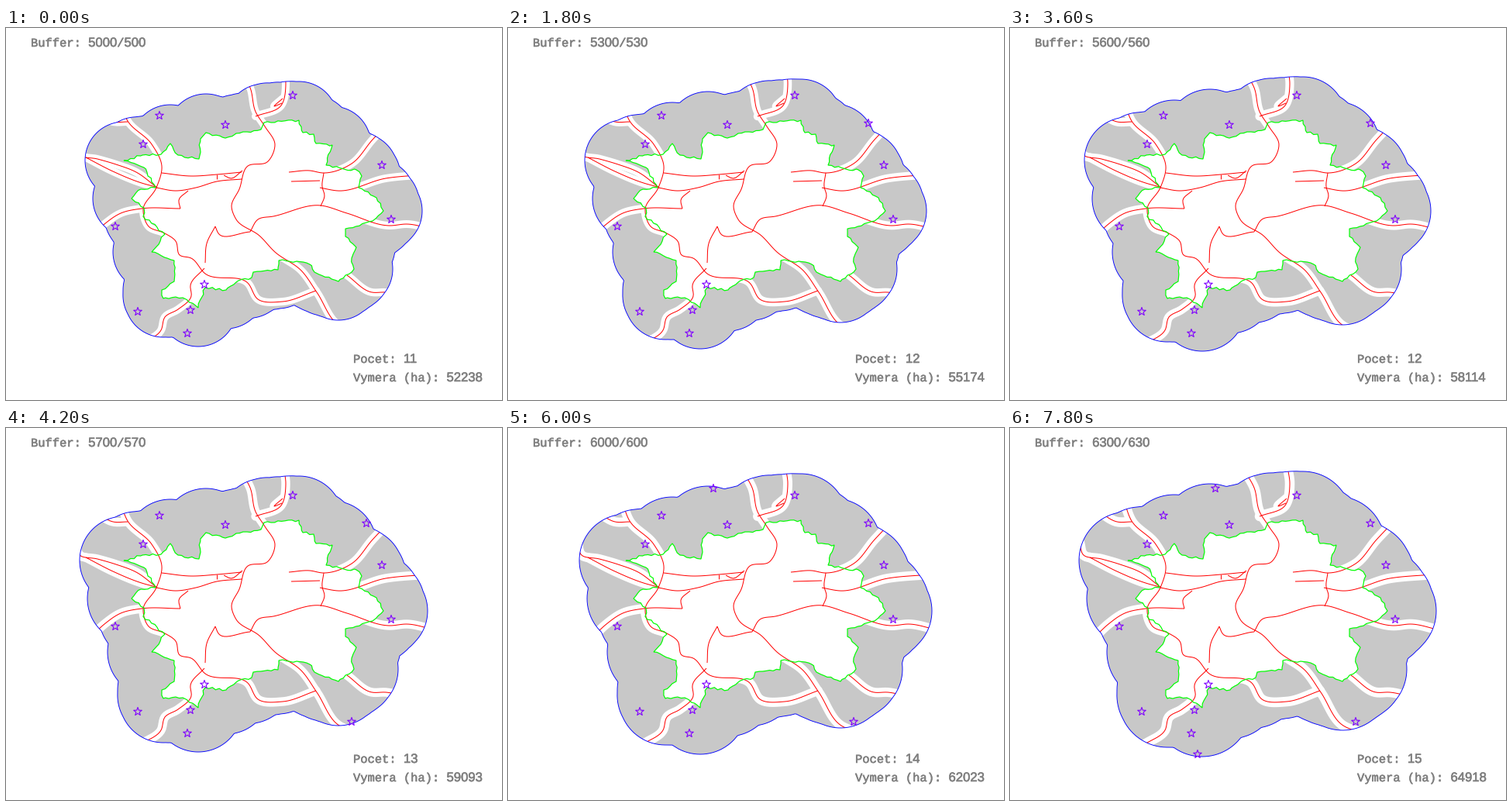
Write a matplotlib script that moves like this. It is 640x480 px and loops after 8000 ms.

```python
import numpy as np
import matplotlib.pyplot as plt
from matplotlib.animation import FuncAnimation
from matplotlib.collections import LineCollection, PolyCollection
from matplotlib.patches import PathPatch, Polygon
from matplotlib.path import Path
from matplotlib.patheffects import withStroke

W, H, DPI = 640, 480, 100
PX = 72 / DPI            # one pixel in points
SCALE = 0.01             # pixels per metre
RADII = np.arange(5000, 6301, 100)
FRAMES, INTERVAL, HOLD = 40, 200, 3
GREY, VIOLET, TEXT = "#c8c8c8", "#8000ff", "#808080"


def points(*xy):
    return np.array(xy, float).reshape(-1, 2)


def smooth(*xy):
    """Cubic curve through the key points, paced by chord length."""
    p = points(*xy)
    t = np.r_[0, np.cumsum(np.hypot(*np.diff(p, axis=0).T))]
    slope = np.gradient(p, t, axis=0)
    s = np.linspace(0, t[-1], max(2, int(t[-1] / 3)))
    k = np.clip(np.searchsorted(t, s, side="right") - 1, 0, len(p) - 2)
    h = (t[k + 1] - t[k])[:, None]
    u = (s - t[k])[:, None] / h
    return ((1 + 2 * u) * (1 - u) ** 2 * p[k] + u * (1 - u) ** 2 * h * slope[k]
            + u ** 2 * (3 - 2 * u) * p[k + 1] + u ** 2 * (u - 1) * h * slope[k + 1])


def ragged(corners, step=4.5, size=1.5):
    """Closed outline through the corners with a seeded uneven edge."""
    rng = np.random.default_rng(4)
    out = []
    for p, q in zip(corners, np.roll(corners, -1, axis=0)):
        length = np.hypot(*(q - p))
        normal = np.array([p[1] - q[1], q[0] - p[0]]) / length
        out.append(p)
        for u in np.arange(step, length - step / 2, step) / length:
            out.append(p + u * (q - p) + normal * rng.uniform(-size, size))
    return np.array(out)


# Corners of the city limits, clockwise from the western tip
CITY = ragged(points(
    152, 171, 176, 164, 200, 163, 212, 149, 222, 164, 249, 169, 251, 143,
    258, 135, 283, 142, 297, 136, 311, 134, 329, 131, 333, 122, 378, 119,
    383, 135, 397, 137, 400, 149, 421, 151, 413, 177, 436, 182, 452, 183,
    459, 191, 455, 206, 478, 219, 487, 236, 473, 249, 438, 259, 438, 269,
    452, 283, 446, 297, 449, 311, 429, 327, 398, 315, 392, 305, 375, 301,
    352, 300, 351, 312, 319, 315, 317, 322, 297, 328, 284, 338, 257, 335,
    248, 361, 228, 348, 203, 349, 201, 338, 217, 327, 217, 300, 188, 289,
    205, 266, 177, 243, 178, 232, 162, 220, 174, 208, 193, 206, 178, 180))

WEST_ROADS = [
    smooth(146, 90, 157, 120, 188, 150, 201, 178, 194, 206, 177, 234, 184, 256,
           205, 265, 219, 275, 224, 293, 239, 297, 257, 317, 312, 329, 325, 350,
           357, 353, 400, 339),
    smooth(116, 109, 138, 121, 157, 121),
    smooth(90, 148, 94, 163, 118, 169, 142, 176, 168, 186, 195, 206),
    smooth(103, 167, 138, 185, 175, 200, 193, 205),
    smooth(110, 269, 127, 253, 148, 239, 175, 233, 225, 233),
    smooth(225, 233, 223, 222, 235, 210),
    smooth(256, 310, 238, 332, 239, 346, 222, 363, 205, 373, 200, 390, 174, 408),
]
CENTRE_ROADS = [
    smooth(194, 206, 218, 210, 245, 206, 272, 198, 304, 195),
    smooth(201, 187, 238, 191, 272, 189, 304, 186),
    smooth(272, 189, 272, 195),
    smooth(281, 190, 290, 194, 305, 184),
    smooth(257, 303, 259, 278, 270, 256),
    smooth(270, 256, 274, 265, 315, 263),
    smooth(368, 198, 405, 197),
    smooth(410, 187, 408, 205, 411, 216, 406, 230),
]
EAST_ROADS = [
    smooth(304, 57, 315, 77, 322, 108, 334, 127, 347, 150, 337, 173, 312, 178,
           301, 208, 291, 230, 297, 247, 327, 268, 347, 289, 381, 313, 401, 341,
           430, 384, 452, 393),
    smooth(358, 50, 361, 72, 355, 100, 322, 114),
    smooth(357, 91, 346, 101, 356, 97),
    smooth(490, 126, 473, 144, 446, 175, 409, 187, 392, 184, 365, 186),
    smooth(545, 189, 490, 194, 428, 210, 405, 206),
    smooth(555, 261, 517, 253, 495, 255, 440, 239, 406, 229, 345, 243, 325, 247,
           315, 263),
    smooth(440, 319, 472, 341, 490, 341, 515, 346),
]
ROADS = WEST_ROADS + CENTRE_ROADS + EAST_ROADS

STARS = points(370, 87, 198, 113, 283, 125, 177, 150, 485, 177, 497, 247,
               141, 256, 256, 331, 238, 364, 170, 366, 234, 394,
               465, 123, 446, 379, 265, 78, 242, 421)
LATE = np.array([5200, 5700, 5800, 6100])   # radius reaching the last stars
AREA = {5000: 52238, 5200: 54193, 5500: 57135, 5700: 59093, 5800: 60072,
        6100: 62999, 6300: 64918}


def distance_field(poly, xs, ys):
    """Distance to the outline, zero inside it."""
    gx, gy = np.meshgrid(xs, ys)
    best = np.full(gx.shape, np.inf)
    for p, q in zip(poly, np.roll(poly, -1, axis=0)):
        d = q - p
        t = np.clip(((gx - p[0]) * d[0] + (gy - p[1]) * d[1]) / (d @ d), 0, 1)
        best = np.minimum(best, np.hypot(gx - p[0] - t * d[0], gy - p[1] - t * d[1]))
    inside = Path(poly).contains_points(np.column_stack([gx.ravel(), gy.ravel()]))
    best[inside.reshape(gx.shape)] = 0
    return best


def star(x, y, size=5.6):
    k = np.arange(10)
    a = np.radians(k * 36 - 90)
    r = np.where(k % 2, 0.4, 1) * size
    return np.column_stack([x + r * np.cos(a), y + r * np.sin(a)])


fig = plt.figure(figsize=(W / DPI, H / DPI), dpi=DPI, facecolor="white")
ax = fig.add_axes([0, 0, 1, 1])
ax.axis("off")

xs, ys = np.arange(70, 571, 2), np.arange(36, 445, 2)
rings = ax.contour(xs, ys, distance_field(CITY, xs, ys), levels=RADII * SCALE)
buffers = [Path(p.vertices.copy(), p.codes.copy()) for p in rings.get_paths()]
rings.remove()
ax.set_xlim(0, W)
ax.set_ylim(H, 0)

zone = ax.add_patch(PathPatch(buffers[0], fc=GREY, ec="none", zorder=1))
ax.add_patch(Polygon(CITY, fc="white", ec="none", zorder=2))
strips = ax.add_collection(LineCollection(
    ROADS, colors="white", capstyle="round", joinstyle="round", zorder=3))
reds = ax.add_collection(LineCollection(
    ROADS, colors="red", linewidths=PX, zorder=4))
ax.add_patch(Polygon(CITY, fc="none", ec="lime", lw=1.2 * PX, zorder=5))
rim = ax.add_patch(PathPatch(buffers[0], fc="none", ec="blue", lw=0.9 * PX, zorder=6))
marks = ax.add_collection(PolyCollection(
    [], facecolors="none", edgecolors=VIOLET, linewidths=1.1 * PX, zorder=7))

# Both fonts are sized so that one character advances by PITCH
PITCH = 9.27
LEFT, RIGHT = 32, 448


def write(text, x, column, y, font, advance):
    return ax.text(x + column * PITCH, y, text, family=font, color=TEXT,
                   fontsize=PITCH / advance * PX, va="baseline", zorder=8,
                   path_effects=[withStroke(linewidth=0.6 * PX, foreground=TEXT)])


def label(text, x, y):
    write(text, x, 0, y, "Liberation Mono", 0.6)


def number(x, column, y):
    return write("", x, column, y, "Liberation Sans", 0.556)


label("Buffer:     /", LEFT, 24)
label("Pocet:", RIGHT, 432)
label("Vymera (ha):", RIGHT, 456)
outer = number(LEFT, 8, 24)
inner = number(LEFT, 13, 24)
total = number(RIGHT, 7, 432)
hectares = number(RIGHT, 13, 456)


def draw(i):
    step = i // HOLD
    radius, edge = int(RADII[step]), buffers[step]
    zone.set_path(edge)
    rim.set_path(edge)
    reds.set_clip_path(edge, ax.transData)
    strips.set_linewidth(2 * radius / 10 * SCALE * PX)

    count = len(STARS) - int(np.sum(LATE > radius))
    marks.set_verts([star(x, y) for x, y in STARS[:count]])

    outer.set_text(str(radius))
    inner.set_text(str(radius // 10))
    total.set_text(str(count))
    area = np.interp(radius, list(AREA), list(AREA.values()))
    hectares.set_text(str(round(area)))
    return zone, strips, reds, rim, marks, outer, inner, total, hectares


anim = FuncAnimation(fig, draw, frames=FRAMES, interval=INTERVAL,
                     repeat=True, repeat_delay=0, blit=False)
plt.show()
```
